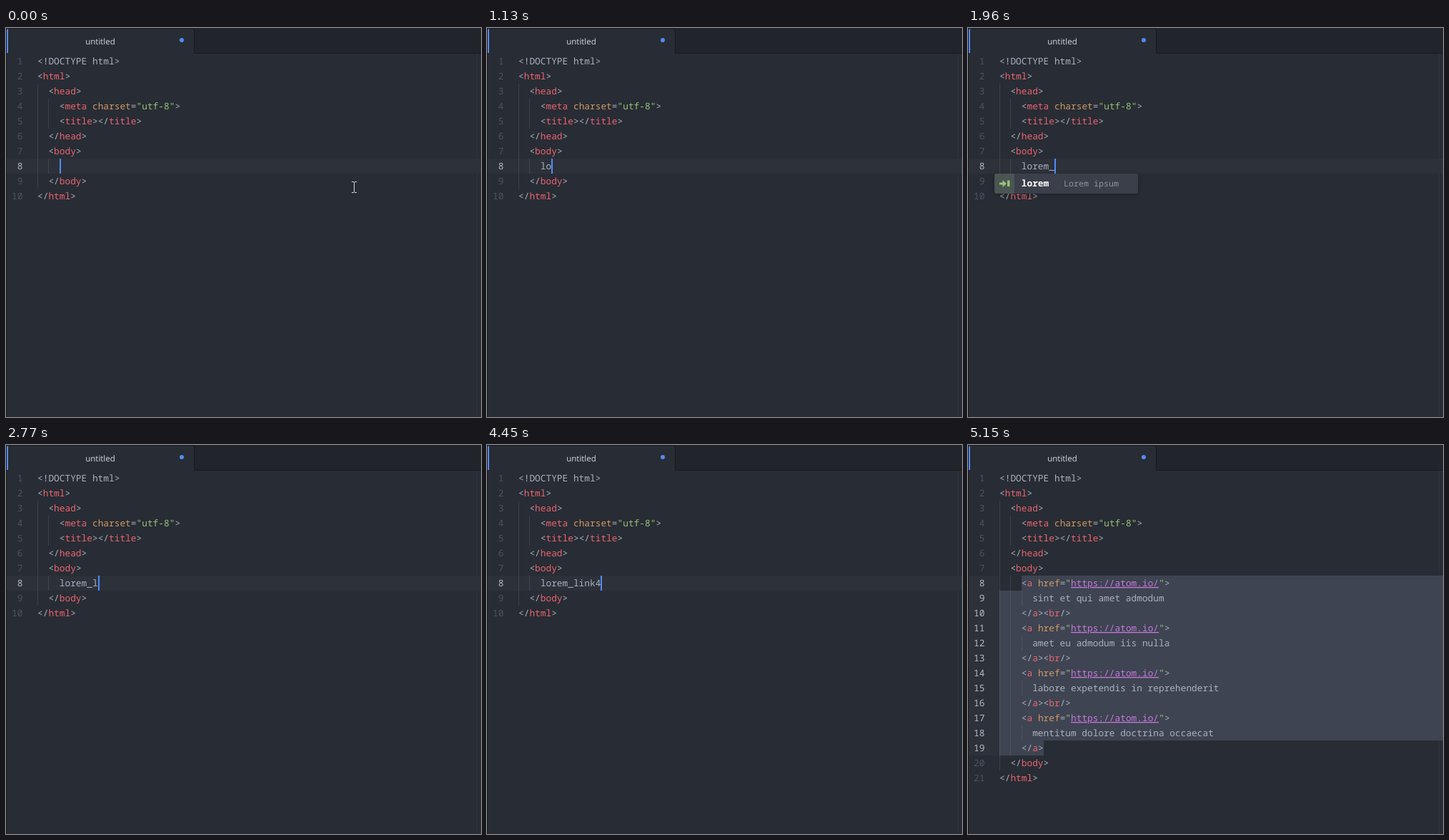
Write an HTML page that moves like this. It is 665 px wide and 545 px high and loops after 7080 ms.

```html
<!DOCTYPE html>
<html lang="en">
<head>
<meta charset="utf-8">
<title>Editor snippet</title>
<style>
  html, body { margin: 0; width: 100%; height: 100%; overflow: hidden; background: #282c34; }
  svg { display: block; width: 665px; height: 545px; }
  text { white-space: pre; text-rendering: geometricPrecision; }
  .mono { font: 12.828px "Noto Sans Mono", "DejaVu Sans Mono", monospace; fill: #abb2bf; }
  .number { text-anchor: end; fill: #4b5364; }
  .active { fill: #b4bbc8; }
  .red { fill: #ec6570; }
  .orange { fill: #d19a66; }
  .green { fill: #98c379; }
  .link { fill: #c678dd; text-decoration: underline; }
  .guide { fill: #abb2bf; fill-opacity: .15; }
  .hint { font-size: 11.67px; fill: #8f95a1; }
  .word { font-weight: 500; fill: #d0d3da; }
  .match { font-weight: 700; fill: #fff; }
  #popup { filter: drop-shadow(0 2px 3px rgba(0, 0, 0, .25)); }
</style>
</head>
<body>
<svg viewBox="0 0 665 545">
  <rect width="665" height="545" fill="#282c34"/>
  <rect width="665" height="36" fill="#21252b"/>
  <rect y="35" width="665" height="1" fill="#181a1f"/>
  <path d="M0 36V0H260Q264 0 264 4V36Z" fill="#181a1f"/>
  <path d="M1 36V3Q1 1 3 1H260Q263 1 263 4V36Z" fill="#282c34"/>
  <path d="M1 35V3Q1 1 3 1V35Z" fill="#568af2"/>
  <text x="132" y="23" text-anchor="middle" fill="#d7dae0" font-size="11.5"
        font-family="'Open Sans', 'Noto Sans', sans-serif">untitled</text>
  <circle cx="246" cy="17" r="3" fill="#568af2"/>
  <rect y="36" width="1" height="509" fill="#181a1f"/>
  <rect x="659" y="36" width="1" height="509" fill="#2f343d"/>

  <g id="editor"></g>
  <rect id="caret" y="183" width="2" height="21" fill="#528bff"/>

  <g id="popup">
    <rect x="37" y="204" width="201" height="28" rx="3" fill="#3b3f4a"/>
    <path d="M65 204H40Q37 204 37 207V229Q37 232 40 232H65Z" fill="#4b5552"/>
    <path d="M44 216.5h4.5v-3.5l5.5 5-5.5 5v-3.5h-4.5zM55 213.5h3.5v8.5h-3.5z" fill="#98c379"/>
    <text id="word" class="mono" x="74.8" y="222"></text>
    <text class="mono hint" x="134" y="222">Lorem ipsum</text>
  </g>

  <path id="pointer" d="M484 215.5h3M488 215.5h3M487.5 216v14M484 230.5h3M488 230.5h3"
        fill="none" stroke="#d8dade"/>
</svg>
<script>
const LOOP = 7080, LEFT = 44, TOP = 36, ROW = 21, CHAR = 7.697;
const EXPAND_AT = 5150, CURRENT = 7;
const byId = id => document.getElementById(id);
const colX = col => LEFT + col * CHAR;
const rowY = row => TOP + row * ROW;

const head = ['<!DOCTYPE html>', '<html>', '  <head>', '    <meta charset="utf-8">',
  '    <title></title>', '  </head>', '  <body>'];
const tail = ['  </body>', '</html>'];
const phrases = ['sint et qui amet admodum', 'amet eu admodum iis nulla',
  'labore expetendis in reprehenderit', 'mentitum dolore doctrina occaecat'];
const links = phrases.flatMap((phrase, i) => [
  '    <a href="https://atom.io/">',
  '      ' + phrase,
  '    </a>' + (i < phrases.length - 1 ? '<br/>' : '')
]);

// Start time and number of typed characters
const typing = [[0, 0], [980, 1], [1130, 2], [1410, 4], [1560, 5], [1960, 6],
  [2650, 7], [2910, 8], [3190, 9], [3310, 10], [4450, 11]];
const caretOff = [[390, 830], [2500, 2650], [3740, 4170], [4880, LOOP]];
const within = (t, [from, to]) => t >= from && t < to;

const rect = (x, y, w, h, attrs) =>
  `<rect x="${x}" y="${y}" width="${w}" height="${h}" ${attrs}/>`;
const escapeText = s => s.replace(/&/g, '&amp;').replace(/</g, '&lt;');
const syntax = /(?<red>(?<=<\/?)\w+)|(?<orange>\w+(?==))|(?<link>https[^"]+)|(?<green>"(?:utf-8")?)/g;

function highlight(line) {
  let out = '', pos = line.search(/\S|$/);
  const add = (end, kind = '') => {
    if (end > pos) {
      out += `<tspan x="${colX(pos)}" class="${kind}">${escapeText(line.slice(pos, end))}</tspan>`;
    }
    pos = end;
  };
  for (const m of line.matchAll(syntax)) {
    add(m.index);
    add(m.index + m[0].length, Object.keys(m.groups).find(k => m.groups[k]));
  }
  add(line.length);
  return out;
}

function background(count) {
  const gutter = rect(1, rowY(CURRENT), LEFT - 1, count * ROW, 'fill="#2c313a"');
  if (count === 1) return gutter + rect(LEFT, rowY(CURRENT), 665 - LEFT, ROW, 'fill="#2c313a"');
  const select = (x, row, right, rows) =>
    rect(x, rowY(row), right - x, rows * ROW, 'fill="#3e4451"');
  return gutter + select(75, CURRENT, 665, 1)
    + select(LEFT, CURRENT + 1, 665, count - 2)
    + select(LEFT, CURRENT + count - 1, 106, 1);
}

function drawEditor(body) {
  const lines = [...head, ...body, ...tail];
  byId('editor').innerHTML = background(body.length) + lines.map((line, row) => {
    const active = row >= CURRENT && row < CURRENT + body.length;
    const indent = line.search(/\S|$/);
    let guides = '';
    for (let col = 0; col < indent; col += 2) {
      guides += rect(Math.floor(colX(col) + .3), rowY(row), 1, ROW, 'class="guide"');
    }
    const y = rowY(row) + 15;
    return guides
      + `<text class="mono number ${active ? 'active' : ''}" x="23.4" y="${y}">${row + 1}</text>`
      + `<text class="mono" y="${y}">${highlight(line)}</text>`;
  }).join('');
}

function show(id, visible) {
  byId(id).style.display = visible ? '' : 'none';
}

let shown = '';
function render(t) {
  const expanded = t >= EXPAND_AT;
  const typed = typing.filter(([start]) => t >= start).pop()[1];
  const key = expanded ? 'links' : 'typed ' + typed;
  if (key !== shown) {
    shown = key;
    drawEditor(expanded ? links : ['    ' + 'lorem_link4'.slice(0, typed)]);
    const match = 'lorem'.slice(0, typed);
    byId('word').innerHTML = `<tspan class="match">${match}</tspan>`
      + `<tspan class="word" x="${colX(4 + match.length)}">${'lorem'.slice(typed)}</tspan>`;
    byId('caret').setAttribute('x', Math.round(colX(4 + typed)));
  }
  show('caret', !caretOff.some(span => within(t, span)));
  show('popup', within(t, [1260, 2770]));
  show('pointer', t < 130);
}

function tick() {
  render(performance.now() % LOOP);
  requestAnimationFrame(tick);
}
tick();
</script>
</body>
</html>
```
